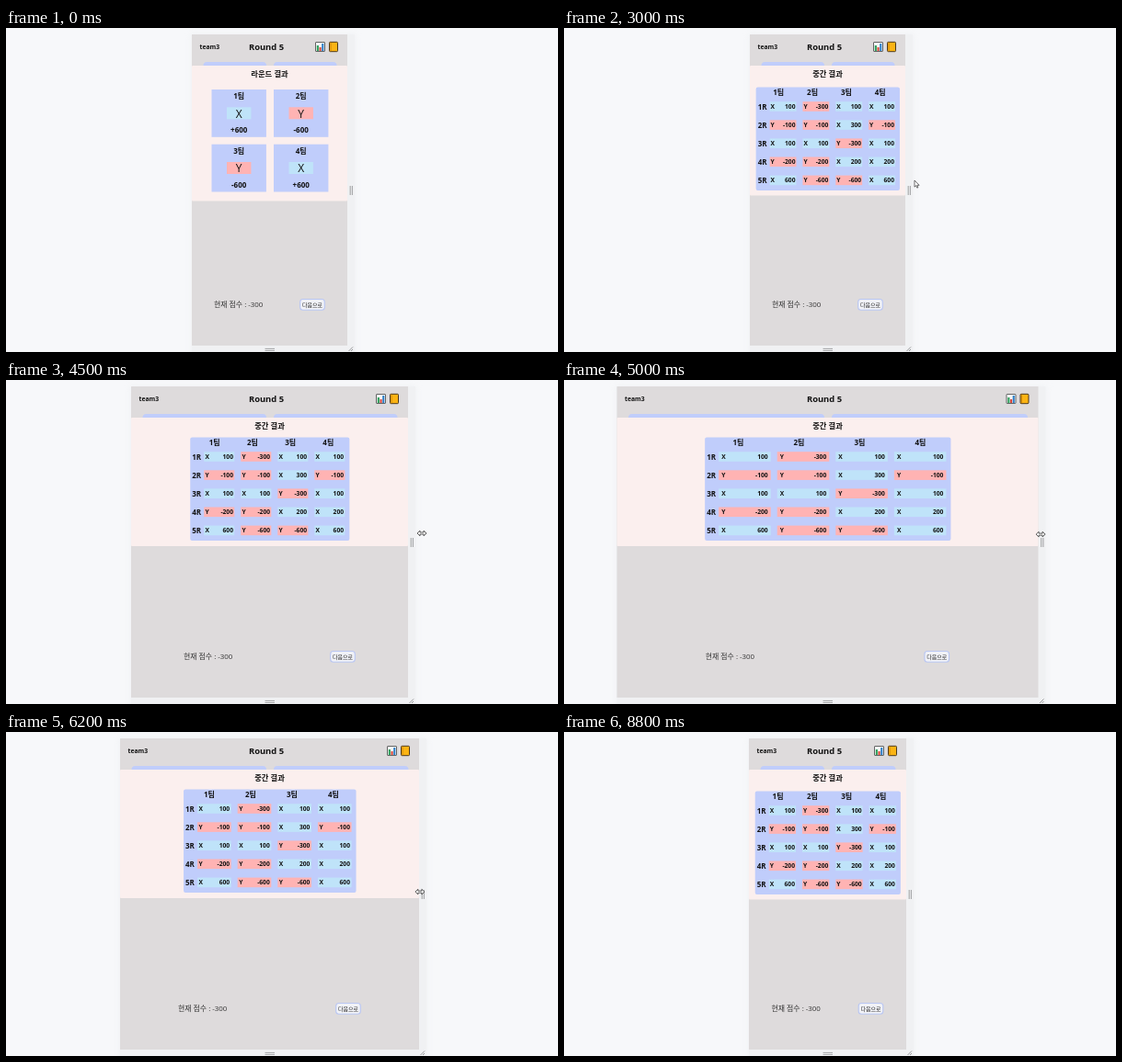
An HTML page that plays this animation: 600x353 px, repeating every 9 s.

```html
<!DOCTYPE html>
<html lang="ko">
<head>
<meta charset="utf-8">
<title>Round results, responsive preview</title>
<style>
html, body { margin: 0; width: 100%; height: 100%; overflow: hidden; background: #f7f8fa; }
svg { display: block; }
text { font-family: "Open Sans", "Noto Sans CJK KR", "Noto Sans CJK", "Noto Sans CJK JP", sans-serif; white-space: pre; }
</style>
</head>
<body>
<svg id="stage" width="600" height="353" viewBox="0 0 600 353"></svg>
<script>
const stage = document.getElementById('stage');
const LOOP = 9000, STEP = 100, CENTER = 286.5;
const PAGE = '#dedbdc', BLUE = '#c0cdfb', MODAL = '#fbefee', X_FILL = '#bfe3f9', Y_FILL = '#ffb3b3';

const scores = [
  [100, -300, 100, 100],
  [-100, -100, 300, -100],
  [100, 100, -300, 100],
  [-200, -200, 200, 200],
  [600, -600, -600, 600]
];

// [time, half width of the page]
const widthKeys = [
  [3600, 84.5], [3800, 88], [4500, 150.5], [5000, 229], [5400, 278.5], [5600, 278.5],
  [5700, 273.5], [6100, 182], [6500, 104], [6700, 85.5]
];

// [time, x, y]
const pointerKeys = [
  [100, 121, 346], [300, 235, 318], [500, 333, 301], [1000, 333, 301], [1600, 341.5, 20], [2400, 341.5, 20],
  [2700, 360, 85], [3000, 381, 166], [3600, 381, 166], [3700, 376, 172], [4500, 452, 167], [5400, 571, 169],
  [5600, 562, 170], [5700, 553, 171], [6500, 388, 176], [6700, 377.5, 177], [7200, 377.5, 177], [7800, 66, 340]
];

function sample(keys, t, col) {
  if (t <= keys[0][0]) return keys[0][col];
  for (let i = 1; i < keys.length; i++) {
    const a = keys[i - 1], b = keys[i];
    if (t <= b[0]) return a[col] + (b[col] - a[col]) * (t - a[0]) / (b[0] - a[0]);
  }
  return keys[keys.length - 1][col];
}

const box = (x, y, w, h, fill, r = 0, extra = '') =>
  `<rect x="${x}" y="${y}" width="${w}" height="${h}" rx="${r}" fill="${fill}" ${extra}/>`;

const path = (d, stroke, width = 1, fill = 'none') =>
  `<path d="${d}" stroke="${stroke}" stroke-width="${width}" fill="${fill}"/>`;

// y is the middle of the line
function label(str, x, y, size, { weight = 700, anchor = 'middle', fill = '#111' } = {}) {
  return `<text x="${x}" y="${y + size * 0.36}" font-size="${size}" font-weight="${weight}" text-anchor="${anchor}" fill="${fill}">${str}</text>`;
}

function chartIcon(x) {
  return box(x - 5, 15.5, 10, 10, '#f4f7f8', 0.5, 'stroke="#555" stroke-width=".9"') +
    box(x - 3.7, 19, 2.1, 6, '#2f9e5b') +
    box(x - 1, 21, 2.1, 4, '#d9483b') +
    box(x + 1.7, 17, 2.1, 8, '#2f7fc8');
}

function bookIcon(x) {
  return box(x - 4.5, 15.3, 9, 10.4, '#fbb414', 1, 'stroke="#3a2a12" stroke-width=".9"') +
    path(`M${x - 3} 15.6V25.4`, '#c47c08', 0.8);
}

function chrome(left, right) {
  const grip = right + 4;
  return box(left - 1, 6, right - left + 10, 352, '#e9ebee', 0, 'opacity=".5" filter="url(#soft)"') +
    box(left, 7, right - left + 8, 346, '#f0f1f3') +
    box(left, 7, right - left, 339, PAGE) +
    path(`M${grip - 0.8} 172V182M${grip + 1.4} 172V182`, '#a5a6a8', 1.1) +
    path(`M281.5 349.4H292M281.5 351.4H292`, '#a5a6a8', 1) +
    path(`M${right + 1.5} 352L${right + 6} 347.5M${right + 4} 352L${right + 6} 350`, '#8d8e90', 0.9);
}

function header(left, right) {
  return label('team3', left + 8.5, 21, 6.8, { anchor: 'start' }) +
    label('Round 5', CENTER - 3.5, 20.5, 9.4) +
    chartIcon(right - 29.5) + bookIcon(right - 15);
}

function teamCards(left, right) {
  const w = CENTER - 3.5 - left - 12.5;
  let out = '';
  for (let i = 0; i < 4; i++) {
    const x = i % 2 ? CENTER + 4.5 : left + 12.5;
    const y = i < 2 ? 37 : 76.7;
    const mid = x + w / 2, own = i === 2;
    out += box(x, y, w, 31.7, BLUE, 4) +
      label(i + 1, mid, y + 7, 6.6, { weight: 400 }) +
      box(mid - 12, y + 10.5, 24, 17.3, own ? Y_FILL : PAGE, 3) +
      label(own ? 'Y' : '?', mid, y + 19.5, 9.4);
  }
  return out;
}

function footer(hw) {
  const bx = CENTER + hw / 2 + 4.25;
  return label('현재 점수 : -300', CENTER - hw / 2 - 18.25, 301.5, 7.9, { weight: 400, anchor: 'start', fill: '#333' }) +
    box(bx - 13.3, 295.5, 26.6, 11.8, '#f1f2f7', 3, 'stroke="#b9c6f2" stroke-width="1.1"') +
    label('다음으로', bx, 301.5, 6, { weight: 400, fill: '#222' });
}

const modalBox = (left, right, bottom, title) =>
  box(left, 41, right - left, bottom - 41, MODAL, 1) + label(title, CENTER, 50.5, 8.3);

function roundModal(left, right) {
  let out = modalBox(left, right, 188.5, '라운드 결과');
  scores[4].forEach((score, i) => {
    const x = i % 2 ? 291 : 223.5, y = i < 2 ? 67 : 126.7, mid = x + 29.7, up = score > 0;
    out += box(x, y, 59.4, 51.8, BLUE) +
      label(`${i + 1}팀`, mid, y + 7.5, 8) +
      box(mid - 13.2, y + 19.3, 26.4, 13, up ? X_FILL : Y_FILL) +
      label(up ? 'X' : 'Y', mid, y + 26.2, 12, { weight: 400 }) +
      label((up ? '+' : '') + score, mid, y + 44.2, 8);
  });
  return out;
}

function tableModal(left, right) {
  const w = right - left, narrow = w < 240, wide = w > 460;
  const tw = narrow ? w * 0.925 : w * 0.6 - 7.5;
  const x0 = CENTER + 0.3 - tw / 2, top = narrow ? 64.5 : 62.5, th = wide ? 129 : 112.5;
  const rowStep = wide ? 23.5 : 20.1, cellH = wide ? 13.4 : 10.6, size = wide ? 8 : 6.7;
  const colStep = (tw - 13) / 4, cellW = colStep - 7, pad = cellW * 0.075 - 1.2;
  const headStep = tw * 0.263 - 4.3;
  let out = modalBox(left, right, top + th + (narrow ? 5.5 : 6), '중간 결과') +
    box(x0, top, tw, th, BLUE, 2);
  for (let c = 0; c < 4; c++) out += label(`${c + 1}팀`, 288.5 + (c - 1.5) * headStep, top + 6, 8);
  scores.forEach((row, r) => {
    const y = top + (wide ? 22.7 : 21) + r * rowStep;
    out += label(`${r + 1}R`, x0 + 2, y + 0.2, 8, { anchor: 'start' });
    row.forEach((score, c) => {
      const x = x0 + 15 + c * colStep, up = score > 0;
      out += box(x, y - cellH / 2, cellW, cellH, up ? X_FILL : Y_FILL) +
        label(up ? 'X' : 'Y', x + pad, y, size, { anchor: 'start' }) +
        label(score, x + cellW - pad, y, size, { anchor: 'end' });
    });
  });
  return out;
}

function pointer(t, left, right) {
  if (t < 100 || t > 7800) return '';
  const x = sample(pointerKeys, t, 1), y = sample(pointerKeys, t, 2);
  if (t >= 3700 && t <= 7200) {
    return path(`M${x - 5} ${y}l3 -2.8v1.8h4v-1.8l3 2.8l-3 2.8v-1.8h-4v1.8z`, '#333', 0.8, '#fff');
  }
  if (x > left && x < right) return `<circle cx="${x}" cy="${y}" r="6" fill="#333" fill-opacity=".55"/>`;
  return path(`M${x} ${y}v7.2l1.7 -1.5l1.1 2.5l1.1 -.5l-1.1 -2.4h2.3z`, '#333', 0.7, '#fff');
}

const defs = '<defs><filter id="soft" x="-10%" y="-10%" width="120%" height="120%"><feGaussianBlur stdDeviation="3"/></filter></defs>';

function render(t) {
  const hw = sample(widthKeys, t, 1), left = CENTER - hw, right = CENTER + hw;
  let out = defs + chrome(left, right) + header(left, right) + teamCards(left, right) + footer(hw);
  if (t < 1000) out += roundModal(left, right);
  else if (t >= 2000) out += tableModal(left, right);
  stage.innerHTML = out + pointer(t, left, right);
}

const start = performance.now();
let shown = -1;
function tick() {
  const t = Math.floor((performance.now() - start) % LOOP / STEP) * STEP;
  if (t !== shown) render(shown = t);
  requestAnimationFrame(tick);
}
tick();
</script>
</body>
</html>
```
